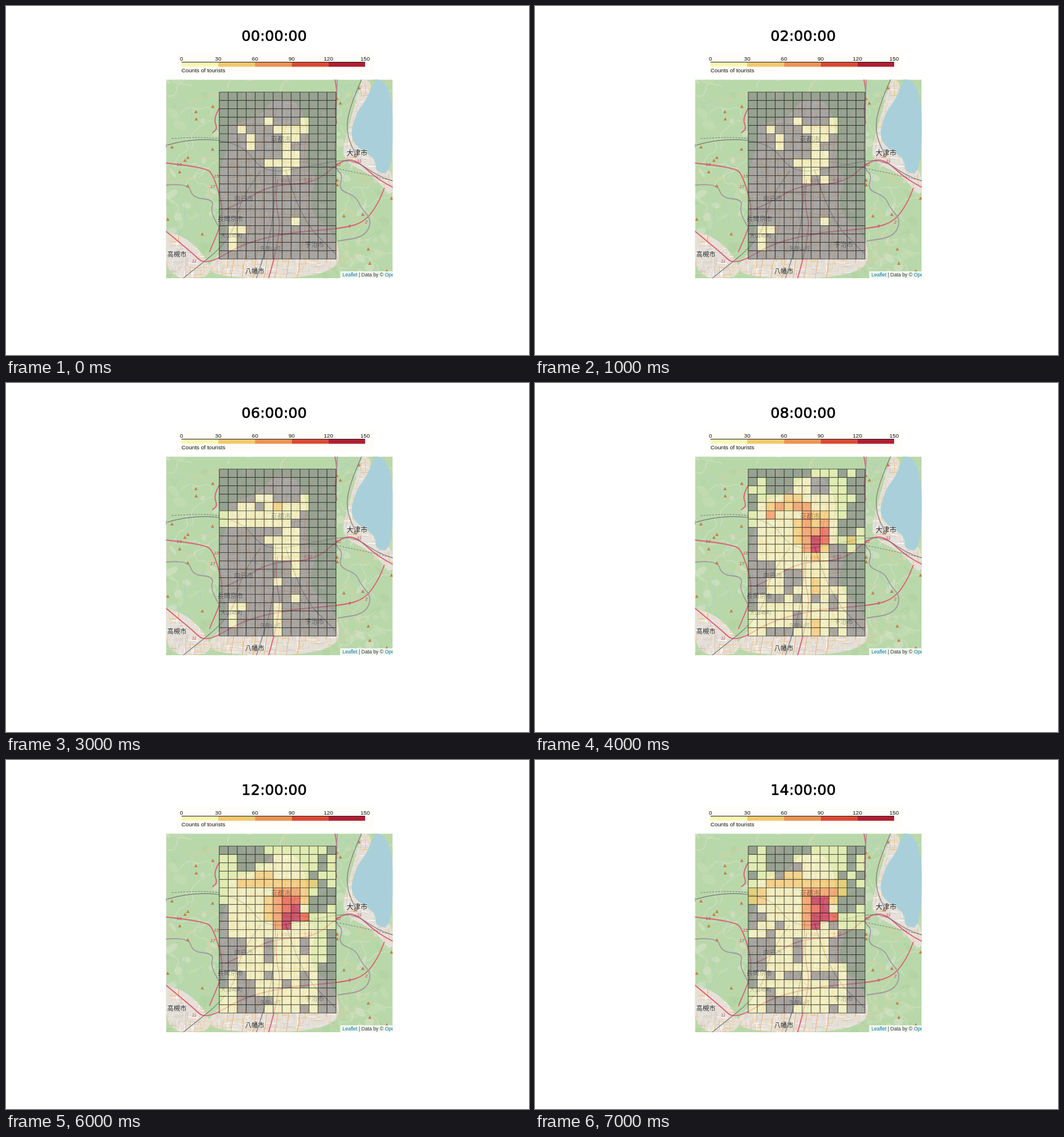
Recreate the animation shown at these times as an HTML page with a canvas. Size 900 by 600 pixels, loop 8000 ms.

```html
<!DOCTYPE html>
<html lang="ja">
<head>
<meta charset="utf-8">
<style>
html, body { margin: 0; width: 100%; height: 100%; overflow: hidden; background: #fff; }
canvas { display: block; }
</style>
</head>
<body>
<canvas id="stage" width="900" height="600"></canvas>
<script>
const MAP = { x: 275.5, y: 126.5, w: 390, h: 341.5 };
const GRID = { x: 367, y: 148, w: 15.45, h: 14.35, cols: 13, rows: 20 };
const SCALE = ['#faf7b4', '#f2c86c', '#eb9452', '#dc4933', '#b01f32'];
const FILL = ['#808080', '#fbfbb8', '#fdcb60', '#fb8d43', '#ee3b28', '#bd0030'];
const SANS = '"Liberation Sans", Arial, sans-serif';
const CJK = '"Noto Sans CJK JP", "Noto Sans CJK", sans-serif';

// Cell ranges: column letter and row, counted from the top left.
// By night, cells light up one after another; by day, only quiet cells stay grey.
const night = [
  { 1: 'F3 J3 C4 G4-J4 D5-D6 H5-I5 H6-H7 I7 F8-I8 H9 I15 B16-C16 B17-B18' },
  { 1: 'G9-G10 I10' },
  { 1: 'A5-G6 G13 G16-G19' },
  { 1: 'E3 D4 F4 I9 H10 I11-I12', 2: 'G4' }
];
const quiet = 'A0 C0-E1 C2-D2 M0 L1-L2 L4-L6 M5-M6 K6-K7 L7 A7-A9 A11-C12 A13-B14 F12-F13 J12 ' +
  'M11-M19 L14-L19 J15-J16 F15 C15 A15-A16 C19-E19 J19';
const noon = 'B0 F1 K3 A10 M10 F11 J11 C16-D17 C18-F18 H16';
const day = [
  { 0: 'B0 K0 F0-G0 A1 H1-I2 E2 M1-M4 A3-A4 J9-K9 M9 A10 J10-M10 J11-L13 E12-E14 D15 H15 F17-F18',
    2: 'E3-F3 C4 E4 H5-I5 F6-F8 H6 L8 I9 H10 H13-H14 H18-H19', 3: 'D4 F4-G4 C5 G5-G9 I6 H7',
    4: 'I7-I8', 5: 'H8-H9' },
  { 0: noon, 2: 'C4 E4 H4-J4 F5 J5-J6 F6-F8', 3: 'D4 G4-I5 G7 H6 G9 H10-I10',
    4: 'E3-F4 G6 G8 I6 H7 J8', 5: 'I7 H8-I8 H9' },
  { 0: noon, 2: 'E3-F3 C4-K4 J5-J6 F6-F8', 3: 'G5-I5 G6-G9', 4: 'H6-I6 H7 J8', 5: 'I7 H8-I8 H9' },
  { 0: 'F0-G0 L0 E2-F2 A3 D3 K3 M3 B8 D9 J9 C10 K10-M10 F11 J11-L13 E15 H15-I15 C17 C18-F18',
    2: 'E3-F3 C4-K4 K5 A5-B6 J6', 3: 'G5-J5 G6-G9', 4: 'H7 J8', 5: 'H6-I6 I7 H8-I8 H9' }
];

function apply(cells, levels) {
  for (const level in levels) {
    for (const range of levels[level].split(' ')) {
      const [from, to = from] = range.split('-');
      const col = s => s.charCodeAt(0) - 65, row = s => +s.slice(1);
      for (let r = row(from); r <= row(to); r++)
        for (let c = col(from); c <= col(to); c++) cells[r * GRID.cols + c] = +level;
    }
  }
  return cells;
}
const blank = level => Array(GRID.cols * GRID.rows).fill(level);
const running = blank(0);
const states = [
  ...night.map(step => [...apply(running, step)]),
  ...day.map(step => apply(apply(blank(1), { 0: quiet }), step))
];

let seed = 7;
const random = (from = 0, to = 1) =>
  from + (to - from) * (seed = seed * 16807 % 2147483647) / 2147483647;
const anywhere = () => [random(MAP.x, MAP.x + MAP.w), random(MAP.y, MAP.y + MAP.h)];

const stage = document.getElementById('stage').getContext('2d');
const mapCanvas = document.createElement('canvas');
mapCanvas.width = 900;
mapCanvas.height = 600;
const map = mapCanvas.getContext('2d');

function text(g, str, x, y, font, color = '#000', align = 'center') {
  g.font = font;
  g.fillStyle = color;
  g.textAlign = align;
  g.fillText(str, x, y);
}

// Path through the points, rounded at the corners.
function curve(points) {
  const p = points.split(' ').map(s => s.split(',').map(Number));
  const path = new Path2D();
  path.moveTo(...p[0]);
  for (let i = 1; i < p.length - 1; i++)
    path.quadraticCurveTo(...p[i], (p[i][0] + p[i + 1][0]) / 2, (p[i][1] + p[i + 1][1]) / 2);
  path.lineTo(...p[p.length - 1]);
  return path;
}

function stroke(path, color, width, dash = []) {
  map.strokeStyle = color;
  map.lineWidth = width;
  map.setLineDash(dash);
  map.stroke(path);
  map.setLineDash([]);
}

// Winding country roads and streams.
function wander(count, color, width) {
  for (let i = 0; i < count; i++) {
    let [x, y] = anywhere(), heading = random(0, 6.3);
    const path = new Path2D();
    path.moveTo(x, y);
    for (let step = 0; step < 14; step++) {
      heading += random(-.8, .8);
      path.lineTo(x += 5 * Math.cos(heading), y += 5 * Math.sin(heading));
    }
    stroke(path, color, width);
  }
}

// Built-up land, filled with short streets that run north or east.
function town(points, streetCount) {
  const outline = curve(points);
  map.fillStyle = '#e5e0d9';
  map.fill(outline);
  map.save();
  map.clip(outline);
  for (let i = 0; i < streetCount; i++) {
    const [x, y] = anywhere(), length = random(5, 22), tilt = random(-2, 2);
    const path = new Path2D();
    path.moveTo(x, y);
    if (i % 2) path.lineTo(x + length, y + tilt);
    else path.lineTo(x + tilt, y + length);
    stroke(path, ['#fff', '#c9c4c0', '#f5d49a', '#d9d1ca', '#f3bf77'][i % 5], random(.5, 1.1));
  }
  map.restore();
}

function drawMap() {
  map.beginPath();
  map.rect(MAP.x, MAP.y, MAP.w, MAP.h);
  map.clip();
  map.fillStyle = '#b9d8aa';
  map.fillRect(MAP.x, MAP.y, MAP.w, MAP.h);
  map.globalAlpha = .5;
  for (let i = 0; i < 140; i++) {
    map.fillStyle = ['#add19e', '#c9dfb7', '#dde6d0'][i % 3];
    map.beginPath();
    map.ellipse(...anywhere(), random(3, 14), random(2, 8), random(0, 3), 0, 7);
    map.fill();
  }
  map.globalAlpha = 1;
  wander(45, '#d6e2cb', 1);
  wander(14, '#a3cfd4', .8);
  wander(26, '#efc79c', 1);

  town('385,205 440,192 455,160 505,160 522,235 513,275 536,292 517,350 575,400 570,468 325,468 386,410 364,300 383,235 385,205', 2600);
  town('275,390 300,390 346,432 355,468 275,468 275,390', 2600);
  town('613,126 640,126 592,215 604,245 666,278 666,335 633,291 575,265 589,210 613,126', 2600);

  const lake = curve('636,126 666,126 666,288 635,286 637,263 602,242 592,219 605,180 618,165 636,126');
  map.fillStyle = '#a9d0da';
  map.fill(lake);

  // Main streets and the roads along the valley.
  for (let i = 0; i < 7; i++) {
    const x = 395 + i * 19;
    stroke(curve(`${x + 14},${170 + i % 3 * 18} ${x},260 ${x + 12},340 ${x - 8},468`), '#f0b07c', 1.1);
    const y = 205 + i * 30;
    stroke(curve(`385,${y} 440,${y - 6} 490,${y + 6} 535,${y}`), '#f0b07c', 1.1);
  }
  const roads = [
    '275,270 343,277 358,292 377,359 350,423',
    '377,350 405,338 454,308 532,305 574,267 601,263 636,295 666,312',
    '275,387 319,423 344,447 410,407 491,389 583,382 619,370 641,338 651,313',
    '566,126 571,150 565,176 569,202', '367,176 357,193 364,211 355,218', '452,468 475,388 464,340 467,298'
  ];
  for (const road of roads) stroke(curve(road), '#df6076', 1.9);
  const railways = [
    '275,240 321,226 407,236 444,289 522,276 594,261 638,291 666,301',
    '438,284 403,330 390,400 305,468', '464,278 463,370 431,468', '481,281 506,365 567,426',
    '612,126 589,178 586,222 604,260'
  ];
  for (const railway of railways) stroke(curve(railway), '#77787d', 1.2);
  stroke(curve('285,228 330,225 367,228'), '#77787d', 1, [3, 2]);
  stroke(curve('510,268 575,280 665,300'), '#77787d', 1, [3, 2]);
  const borders = [
    '275,308 314,304 321,330 358,333 352,354 369,385',
    '570,126 567,211 565,279 580,290 572,316 602,327 611,347 630,369 617,397 571,404'
  ];
  for (const border of borders) stroke(curve(border), '#a3989f', 1.8);

  for (let i = 0; i < 46; i++) {
    const [x, y] = anywhere();
    if (map.isPointInPath(lake, x, y) || x > 375 && x < 565) continue;
    map.fillStyle = '#c77f4b';
    map.beginPath();
    map.moveTo(x, y - 3);
    map.lineTo(x + 3, y + 2.5);
    map.lineTo(x - 3, y + 2.5);
    map.fill();
  }

  const roadNumbers = '14,298,275 15,362,295 17,356,313 32,572,275 31,608,269 3,591,381 2,620,374 11,324,441 E-01,481,303 8-01,520,301';
  for (const item of roadNumbers.split(' ')) {
    const [name, x, y] = item.split(',');
    text(map, name, x, y, `italic 7.5px ${SANS}`, '#c4425c');
  }
  const places = '京都市,473,234,12 大津市,604,257,12 向日市,409,335,11 長岡京市,386,370,11 大山崎町,388,398,9.5 久御山町,455,420,9 宇治市,531,414,11 高槻市,294,431,11 八幡市,428,460,11 市,273,244,9';
  for (const item of places.split(' ')) {
    const [name, x, y, size] = item.split(',');
    map.font = `${size}px ${CJK}`;
    map.textAlign = 'center';
    map.lineWidth = 1.5;
    map.strokeStyle = '#fff8';
    map.strokeText(name, x, y);
    text(map, name, x, y, map.font, '#222');
  }

  map.fillStyle = '#fffc';
  map.fillRect(575, 456, 91, 12);
  const font = `8.5px ${SANS}`;
  text(map, 'Leaflet', 579, 465, font, '#0078a8', 'left');
  text(map, '| Data by ©', 607, 465, font, '#333', 'left');
  text(map, 'OpenStreetMap', 652, 465, font, '#0078a8', 'left');
}

function drawLegend() {
  const x = 302, w = 63.2, font = `9.7px ${SANS}`;
  stage.fillStyle = '#fefdf9';
  stage.fillRect(293, 80, 340, 39);
  SCALE.forEach((color, i) => {
    stage.fillStyle = color;
    stage.fillRect(x + i * w, 96, w, 8.5);
  });
  stage.fillStyle = '#222';
  stage.fillRect(x, 96, 5 * w, 1);
  for (let i = 0; i <= 5; i++) text(stage, i * 30, x + i * w, 94, font, '#111');
  text(stage, 'Counts of tourists', x, 113.5, font, '#111', 'left');
}

function drawCells(cells) {
  const { x, y, w, h, cols, rows } = GRID;
  stage.globalAlpha = .6;
  cells.forEach((level, i) => {
    stage.fillStyle = FILL[level];
    stage.fillRect(x + i % cols * w, y + Math.floor(i / cols) * h, w, h);
  });
  stage.strokeStyle = '#000';
  stage.lineWidth = 1.2;
  stage.beginPath();
  for (let c = 0; c <= cols; c++) {
    stage.moveTo(x + c * w, y);
    stage.lineTo(x + c * w, y + rows * h);
  }
  for (let r = 0; r <= rows; r++) {
    stage.moveTo(x, y + r * h);
    stage.lineTo(x + cols * w, y + r * h);
  }
  stage.stroke();
  stage.globalAlpha = 1;
}

function draw(time) {
  const step = Math.floor(time / 1000) % states.length;
  const clock = String(step * 2).padStart(2, '0') + ':00:00';
  stage.fillStyle = '#fff';
  stage.fillRect(0, 0, 900, 600);
  text(stage, clock, 461.5, 60, '25px "DejaVu Sans", sans-serif');
  stage.strokeStyle = '#000';
  stage.lineWidth = .7;
  stage.strokeText(clock, 461.5, 60);
  drawLegend();
  stage.drawImage(mapCanvas, 0, 0);
  drawCells(states[step]);
  requestAnimationFrame(frame);
}

let start;
function frame(now) {
  start ??= now;
  draw(now - start);
}

drawMap();
draw(0);
</script>
</body>
</html>
```
